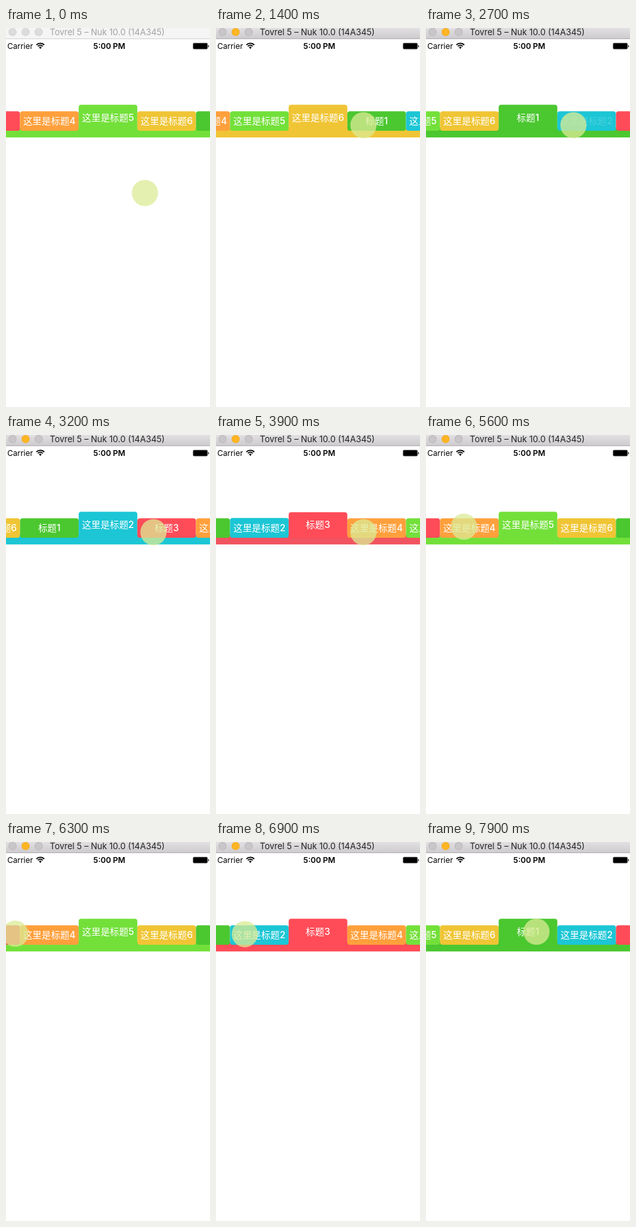
These frames come from a looping animation (312x579 px, 8000 ms). An HTML page with a canvas:

```html
<!DOCTYPE html>
<html lang="zh-CN">
<head>
<meta charset="utf-8">
<title>Tab carousel</title>
<style>
  html, body { margin: 0; width: 100%; height: 100%; overflow: hidden; background: #fff; }
  canvas { display: block; width: 312px; height: 579px; }
</style>
</head>
<body>
<canvas id="stage"></canvas>
<script>
const W = 312, H = 579, LOOP = 8000, STEP = 100;
const TAB_W = 89.7, MID_X = 156, TAB_TOP = 127.3, TAB_BOTTOM = 157, LIFT = 10;
const BAR_TOP = 152, BAR_BOTTOM = 167.2;
const SCROLL_MS = 270, RAISE_MS = 330, ACTIVE_AT = 1000;
const UI_FONT = 'Inter, Roboto, sans-serif';
const TAB_FONT = '500 14.2px Inter, "Noto Sans CJK SC", "Noto Sans CJK", sans-serif';

const tabs = [
  { label: '标题1', color: [75, 199, 48] },
  { label: '这里是标题2', color: [28, 198, 213] },
  { label: '标题3', color: [255, 76, 88] },
  { label: '这里是标题4', color: [255, 160, 60] },
  { label: '这里是标题5', color: [115, 224, 58] },
  { label: '这里是标题6', color: [240, 197, 53] }
];

// Tab numbers keep counting past 6 so the carousel wraps.
const taps = [
  { press: 1000, start: 1050, to: 6 },
  { press: 1800, start: 1950, to: 7 },
  { press: 2700, start: 2850, to: 8 },
  { press: 3620, start: 3620, to: 9 },
  { press: 4800, start: 4850, to: 11 },
  { press: 6300, start: 6350, to: 9 },
  { press: 7300, start: 7350, to: 7 }
];

// Pointer stops: time, x, y
const pointerPath = [
  [0, 212.5, 252], [100, 210.5, 243], [250, 210.5, 243], [600, 225.5, 148.5],
  [4050, 225.5, 148.5], [4600, 300, 148.5], [5150, 300, 148.5], [5600, 58, 140],
  [6000, 14, 140], [6650, 14, 140], [6900, 44, 140.7], [7100, 12, 140],
  [7550, 12, 140], [7900, 169, 137]
];

const canvas = document.getElementById('stage');
const ctx = canvas.getContext('2d');
const ratio = window.devicePixelRatio || 1;
canvas.width = Math.round(W * ratio);
canvas.height = Math.round(H * ratio);

const clamp = v => Math.max(0, Math.min(1, v));
const mix = (a, b, p) => a + (b - a) * p;
const smooth = p => p * p * (3 - 2 * p);
const easeOut = p => 1 - (1 - p) * (1 - p);
const tabAt = n => tabs[(n - 1) % tabs.length];
const rgb = c => `rgb(${c.map(Math.round).join(',')})`;

function rect(x, y, w, h, color) {
  ctx.fillStyle = color;
  ctx.fillRect(x, y, w, h);
}

function roundRect(x, y, w, h, radii, color) {
  ctx.beginPath();
  ctx.roundRect(x, y, w, h, radii);
  ctx.fillStyle = color;
  ctx.fill();
}

function disc(x, y, r, color) {
  ctx.beginPath();
  ctx.arc(x, y, r, 0, Math.PI * 2);
  ctx.fillStyle = color;
  ctx.fill();
}

function text(str, x, y, font, color, align = 'left') {
  ctx.font = font;
  ctx.fillStyle = color;
  ctx.textAlign = align;
  ctx.fillText(str, x, y);
}

function drawTitleBar(active) {
  let fill = '#f5f5f5';
  if (active) {
    fill = ctx.createLinearGradient(0, 0, 0, 16);
    fill.addColorStop(0, '#e2e0e2');
    fill.addColorStop(1, '#cecbce');
  }
  rect(0, 0, W, 16, fill);
  rect(0, 16, W, 1, active ? '#b3b0b3' : '#d3d3d3');
  for (let i = 0; i < 3; i++) {
    const lit = active && i === 1;
    const color = lit ? '#fdb524' : active ? '#c9c6c9' : '#dcdcdc';
    const edge = lit ? '#f0ac28' : active ? '#b8b5b8' : '#d4d4d4';
    disc(10 + i * 20, 6.2, 6.2, edge);
    disc(10 + i * 20, 6.2, 5.4, color);
  }
  text('Tovrel 5 – Nuk 10.0 (14A345)', 67, 11, '13px ' + UI_FONT, active ? '#222' : '#a2a2a2');
}

function drawStatusBar() {
  text('Carrier', 2, 32, '12px ' + UI_FONT, '#000');
  text('5:00 PM', 158, 32, '600 12px ' + UI_FONT, '#000', 'center');

  ctx.strokeStyle = '#000';
  ctx.lineWidth = 1.8;
  for (const r of [8.2, 5.1]) {
    ctx.beginPath();
    ctx.arc(52.5, 31.5, r, -Math.PI * 0.76, -Math.PI * 0.24);
    ctx.stroke();
  }
  ctx.beginPath();
  ctx.moveTo(52.5, 32);
  ctx.arc(52.5, 31.5, 2.8, -Math.PI * 0.76, -Math.PI * 0.24);
  ctx.fillStyle = '#000';
  ctx.fill();

  roundRect(285.8, 22.7, 22.7, 9.8, 2, '#555');
  roundRect(286.6, 23.5, 21.1, 8.2, 1.2, '#000');
  roundRect(309, 26, 1.5, 3.5, [0, 1.5, 1.5, 0], '#333');
}

function carouselState(t) {
  let from = 5, to = 5, start = -LOOP, pressed = 0;
  for (const tap of taps) {
    if (t >= tap.start) {
      from = to;
      to = tap.to;
      start = tap.start;
    } else if (t >= tap.press) {
      pressed = tap.to;
    }
  }
  return {
    from, to, pressed,
    pos: mix(from, to, smooth(clamp((t - start) / SCROLL_MS))),
    raise: smooth(clamp((t - start) / RAISE_MS))
  };
}

function drawTab(n, s) {
  const x = MID_X + (n - s.pos - 0.5) * TAB_W;
  const { label, color } = tabAt(n);
  const lift = n === s.to ? s.raise : n === s.from ? 1 - s.raise : 0;
  const top = TAB_TOP - LIFT * lift;
  roundRect(x, top, TAB_W, TAB_BOTTOM - top, 4, rgb(color));
  ctx.globalAlpha = n === s.pressed ? 0.2 : 1;
  text(label, x + TAB_W / 2, (top + TAB_BOTTOM) / 2 + 5, TAB_FONT, '#fff', 'center');
  ctx.globalAlpha = 1;
}

function drawCarousel(t) {
  const s = carouselState(t);
  const target = tabAt(s.to).color;
  const barColor = tabAt(s.from).color.map((c, i) => mix(c, target[i], s.raise));
  rect(0, BAR_TOP, W, BAR_BOTTOM - BAR_TOP, rgb(barColor));
  const mid = Math.round(s.pos);
  for (let n = mid - 3; n <= mid + 3; n++) drawTab(n, s);
}

function drawPointer(t) {
  let i = 0;
  while (i < pointerPath.length - 2 && t >= pointerPath[i + 1][0]) i++;
  const [t0, x0, y0] = pointerPath[i];
  const [t1, x1, y1] = pointerPath[i + 1];
  const p = easeOut(clamp((t - t0) / (t1 - t0)));
  disc(mix(x0, x1, p), mix(y0, y1, p), 20, 'rgba(219, 235, 148, 0.75)');
}

function draw(t) {
  ctx.setTransform(ratio, 0, 0, ratio, 0, 0);
  rect(0, 0, W, H, '#fff');
  drawTitleBar(t >= ACTIVE_AT);
  drawStatusBar();
  drawCarousel(t);
  drawPointer(t);
}

const begin = performance.now();
function tick() {
  const t = (performance.now() - begin) % LOOP;
  draw(Math.floor(t / STEP) * STEP);
  requestAnimationFrame(tick);
}
tick();
</script>
</body>
</html>
```
